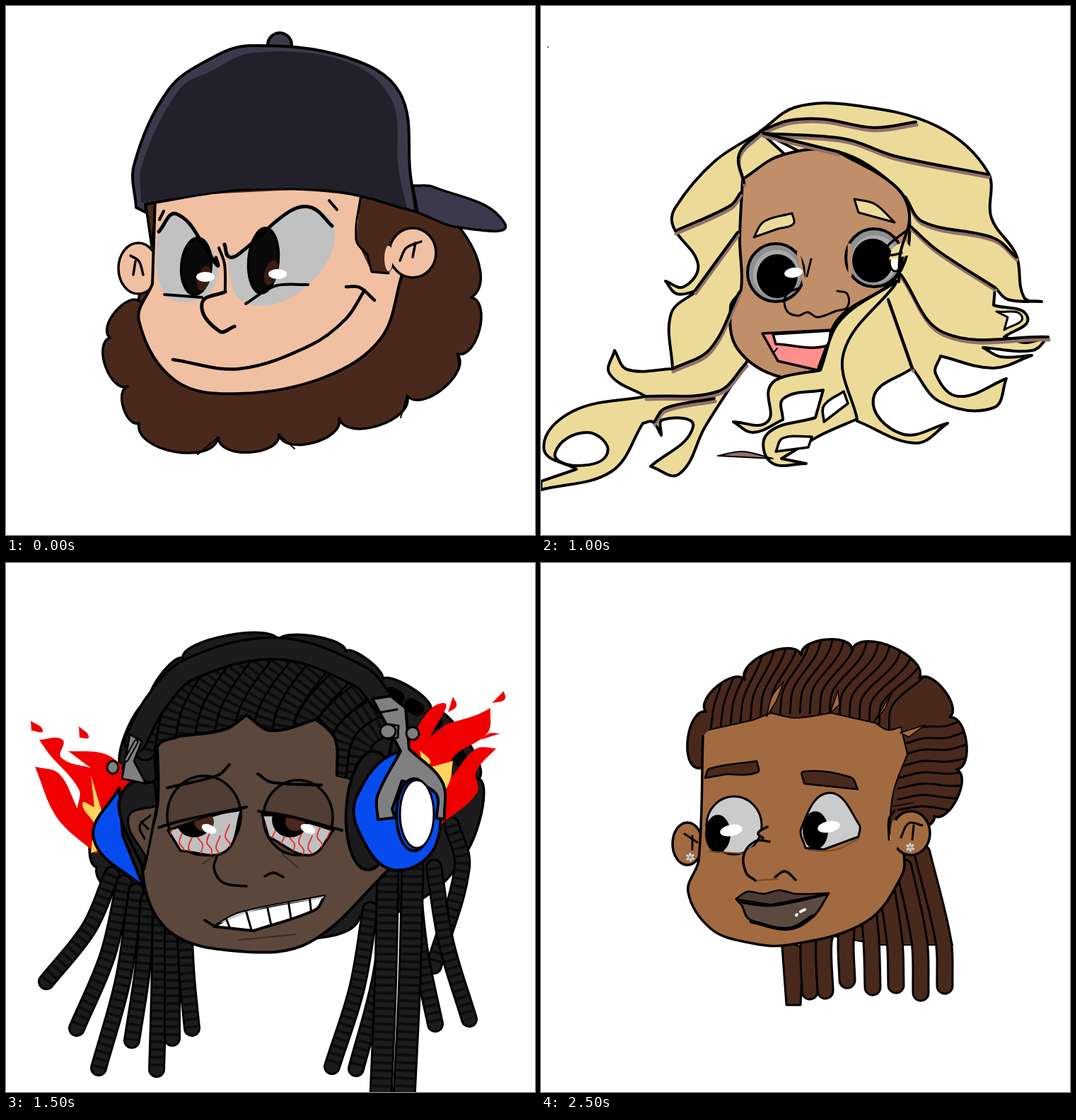
Write an HTML page with a canvas that moves like this. It is 748 px wide and 748 px high and loops after 3000 ms.

```html
<!DOCTYPE html>
<html lang="en">
<head>
<meta charset="utf-8">
<style>
html,body{margin:0;width:100%;height:100%;overflow:hidden;background:#fff}
canvas{display:block;width:100vw;height:100vh}
</style>
</head>
<body>
<canvas id="stage" width="748" height="748"></canvas>
<script>
const g = document.getElementById('stage').getContext('2d');
const TAU = Math.PI * 2, BLACK = '#000', WHITE = '#fff';
g.lineCap = g.lineJoin = 'round';

const pairs = text => (text.match(/-?[\d.]+ -?[\d.]+/g) || []).map(p => p.split(' ').map(Number));
const gap = (a, b) => Math.hypot(b[0] - a[0], b[1] - a[1]) || 1;

// Smooth path through points; "/" makes a corner, a final "z" closes the path.
function trace(text) {
  const path = new Path2D(), closed = text.endsWith('z');
  const parts = text.split('/').map(pairs), first = parts[0][0];
  const loop = closed && parts.length < 2;
  if (closed) parts[parts.length - 1].push(first);
  path.moveTo(...first);
  let last;
  parts.forEach((pts, k) => {
    if (k) pts.unshift(last);
    last = pts[pts.length - 1];
    for (let i = 0; i < pts.length - 1; i++) {
      const b = pts[i], c = pts[i + 1], reach = gap(b, c) * .35;
      const a = pts[i - 1] || (loop ? pts[pts.length - 2] : b);
      const d = pts[i + 2] || (loop ? pts[1] : c);
      const p = reach / gap(a, c), q = reach / gap(b, d);
      path.bezierCurveTo(
        b[0] + (c[0] - a[0]) * p, b[1] + (c[1] - a[1]) * p,
        c[0] - (d[0] - b[0]) * q, c[1] - (d[1] - b[1]) * q, ...c);
    }
  });
  if (closed) path.closePath();
  return path;
}
// Closed outline whose sides all bulge outwards.
function lumps(pts, bulge) {
  const path = new Path2D();
  path.moveTo(...pts[0]);
  pts.forEach((a, i) => {
    const b = pts[(i + 1) % pts.length];
    const x = (b[1] - a[1]) * bulge, y = (a[0] - b[0]) * bulge;
    path.bezierCurveTo(a[0] + x, a[1] + y, b[0] + x, b[1] + y, ...b);
  });
  return path;
}
function paint(path, fill, width, color = BLACK) {
  if (fill) { g.fillStyle = fill; g.fill(path); }
  if (width) { g.lineWidth = width; g.strokeStyle = color; g.stroke(path); }
}
const shape = (text, fill, width = 3.5) => paint(trace(text), fill, width);
const line = (text, width = 3.5, color) => text.split('|').forEach(t => paint(trace(t), null, width, color));
function oval(x, y, rx, ry, fill, width = 0, tilt = 0) {
  const path = new Path2D();
  path.ellipse(x, y, rx, ry, tilt, 0, TAU);
  paint(path, fill, width);
}
function inside(path, draw) {
  g.save(); g.clip(path); draw(); g.restore();
}
// Rope of hair, optionally with cross stripes.
function rope(text, width, color, stripe) {
  line(text, width + 6);
  line(text, width, color);
  if (!stripe) return;
  g.save(); g.lineCap = 'butt'; g.setLineDash([4, 7]);
  line(text, width, stripe);
  g.restore();
}

function capMan() {
  const hair = '#49291c', skin = '#f1c0a2', cloth = '#3b394b';
  paint(lumps(pairs('575 285 658 412 638 492 567 551 471 583 386 606 300 610 188 590 172 538 147 469 190 418 207 395'), .36), hair, 3.5);
  line('271 634 300 610|386 606 408 626|558 582 567 552|638 491 641 513', 2);
  shape('196 270/206 340/215 270/z', hair);
  oval(187, 371, 28, 36, skin, 3.5);
  const jaw = '211 270 207 393/188 445 240 530 330 548 450 525 530 470 560 380';
  shape(jaw + '/575 300/500 255/z', skin, 0);
  line(jaw, 4);
  shape('502 262/495 330/517 376/541 378/600 300/z', hair, 0);
  line('502 265/495 330 511 352/517 376/541 378', 3);
  oval(575, 349, 33, 35, skin, 3.5);
  oval(541, 357, 6, 18, skin);
  line('557 360 566 342 587 333|579 335 575 355|176 353 188 361 194 380|183 361 180 380');
  shape('575 254 605 256 705 307 640 313 582 292/z', cloth);
  oval(387, 55, 17, 17, cloth, 4);
  shape('184 285 181 225 230 118 290 74 345 56 480 72 557 123 572 240 580 291/470 263 330 260 197 280/198 292/z', cloth, 4);
  shape('191 278 192 225 245 118 290 92 350 66 480 78 545 132 555 230 567 285/470 261 330 258/z', '#22212b', 0);
  shape('216 318 241 294 280 333 301 365 280 412 225 407z', '#c1c1c1', 0);
  shape('314 354 335 347 400 290 463 308 429 393 340 421z', '#c1c1c1', 0);
  for (const [x, y, ry, shine, sy] of [[269, 368, 40, 282, 383], [364, 360, 46, 384, 379]]) {
    oval(x, y, 21, ry, '#0a0a0a', 4, .08);
    oval(x + 11, y + 17, 9, 18, '#3a1d14', 0, .3);
    oval(shine, sy, 13, 7, WHITE);
  }
  line('216 319 241 294 285 346 299 367 297 356|309 337 316 355 335 346 400 291 432 285 461 311', 5);
  line('224 408 277 412|339 421 380 396 427 394|301 342 309 365 310 403|217 302 223 290|457 275 468 288', 4);
  shape('310 404 277 421 302 460 323 453', skin, 5);
  line('236 500 330 513 430 480 480 443 507 402|481 397 500 398 521 416', 4.5);
}

function flame(x, y, flip) {
  g.save(); g.translate(x, y); g.scale(flip, 1);
  [['#ee2a10', 1.05], ['#ff9a20', .65], ['#ffe45c', .35]].forEach(([color, k]) => {
    g.setTransform(flip * k, 0, 0, k, x, y + 14 * (1 - k));
    shape('0 17/-8 5 -7 -8/1 -5 8 -18/6 -8 5 12/z', color, 0);
  });
  g.restore();
}
function cable(text, width) {
  line(text, width); line(text, width - 2.6, '#e4e4e1');
}
function afroWoman() {
  const skin = '#5b473b', cord = '#e4e4e1', curls = 46;
  const ring = (a, x, y, rx, ry) => [x + rx * Math.cos(a), y + ry * Math.sin(a)];
  paint(lumps(Array.from({length: curls}, (_, i) => ring(i * TAU / curls, 405, 253, 278, 246)), .22), '#0f0f0f', 5);
  paint(lumps(pairs('220 400 200 265 270 150 365 112 466 98 542 150 583 238 595 325 570 440 465 495 350 400'), .32), BLACK);
  oval(217, 414, 15, 25, '#49382e', 3);
  oval(506, 402, 26, 29, skin);
  const jaw = '235 400 219 465 255 523 340 545 450 517 487 485 494 425';
  shape(jaw + '/520 410 510 374/478 270 360 230 240 320z', skin, 0);
  line(jaw);
  for (let i = 0; i < 15; i++) oval(...ring(TAU / 2 + i * TAU / 28, 372, 331, 144, 98), 16, 16, BLACK);
  line('484 416 492 378 525 383|490 405 507 386', 2.5);
  for (const [x, y, out] of [[290, 379, -1], [411, 381, 1]]) {
    [2.7, 3.6, 4.2, 5.5, 1.1, 1.5, 2].forEach(a => {
      a = out < 0 ? a : TAU / 2 - a;
      line([ring(a, x, y, 40, 43), ring(a + .1, x, y, 49, 52)].join(' ').replace(/,/g, ' '), 5);
    });
    oval(x, y, 41, 44, '#808080', 4);
    oval(x + 4, y - 2, 27, 27, BLACK);
    oval(x + 5, y + 14, 17, 10, '#3a2018');
    oval(x + 2, y + 4, 18, 14, BLACK);
    oval(x + 22, y + 4, 14, 8, WHITE, 0, -.25);
  }
  shape('266 298 275 292 312 288 312 300z', '#111', 2);
  shape('384 305 428 306 427 315 392 312z', '#111', 2);
  line('331 375 313 415 335 458', 3);
  oval(362, 447, 5, 7, null, 4);
  const lip = '297 484/312 477 330 480 345 474 360 479 393 478/';
  shape(lip + '385 502 345 517 303 490/z', '#c62404', 2.5);
  shape(lip + '335 488/z', '#de2d0b', 1);
  line('301 486 345 490 391 479', 4);
  line('361 500 363 499|366 497 369 495', 4, WHITE);
  oval(224, 412, 6, 10, cord, 2);
  oval(511, 404, 9, 14, cord, 2);
  shape('213 416/220 418/218 443/212 442/z', cord, 2);
  shape('518 402/526 403/522 445/516 445/z', cord, 2);
  flame(209, 397, -1);
  flame(529, 391, 1);
  cable('216 443 214 490', 3);
  shape('208 491/214 491/210 535/201 533/z', cord, 2);
  line('208 502 205 527', 3, '#777');
  cable('204 536 225 565 300 570 366 597 375 619', 5);
  cable('519 446 511 512 470 555 394 580 375 622', 6);
  cable('375 615 376 627', 4);
  shape('373 627/381 627/380 644/372 643/z', cord, 2);
  line('376 644 377 659', 3);
}

function strand(text) {
  g.save(); g.translate(1, 4); line(text, 5, '#8f706a'); g.restore();
  line(text, 4);
}
function blondeWoman() {
  const hair = '#ecdb98', skin = '#c08e68';
  oval(10, 58, 1, 1, '#333');
  shape('310 178 245 220 190 285 187 312 222 365 202 397 176 389/192 407 220 403/184 435 186 513/122 514 104 487/97 520 148 552/45 573 4 625 50 655/0 672/0 684/100 658 144 590/158 588 170 607/172 585 215 595 155 651/195 662 232 595 290 505/350 400/345 210/z', hair, 4);
  shape('20 632 65 603 94 632 50 650z', WHITE, 4);
  shape('310 177 360 143 440 140 560 170 632 235 637 300 672 352 683 412 708 418/660 415 642 398/640 423/688 440 655 468/685 476 717 468/695 487 625 483/650 496 694 494/640 512 565 495/558 520 590 552 658 527/640 568 565 560 525 512/470 555 510 605 575 590/530 618 447 587/400 450/470 260/z', hair, 4);
  shape('285 245 340 211 420 206 500 254 521 295 505 380 420 443 395 515/340 525 278 485 268 425 283 400 281 330z', skin, 4);
  for (const [x, y, px, py] of [[332, 377, 334, 382], [471, 356, 469, 360]]) {
    oval(x, y, 40, 41, '#8f8f8f', 4);
    oval(x + 1, y + 2, 33, 34, '#a9a9a9');
    oval(px, py, 29, 31, BLACK);
  }
  line('364 350 372 392|437 380 436 338', 5, skin);
  oval(357, 377, 13, 7, WHITE, 0, -.15);
  oval(501, 362, 8, 13, WHITE, 3);
  shape('301 327/315 305 355 293/357 308 335 315/z', hair, 3);
  shape('443 273/472 280 500 306/449 292/z', hair, 3);
  line('364 399 347 408 347 430 363 438 377 433 391 440 418 431 433 426 433 407 419 403|382 358 376 382', 3);
  shape('313 463/412 458/391 515/335 502/z', '#ff8f8c');
  shape('328 464 410 459/402 481 332 478/z', WHITE);
  line('329 490 334 484', 2);
  shape('503 389 423 445 395 515/338 526 322 542 320 588 272 588/300 603 342 585/343 555 399 543/388 582/320 605 325 645 375 647/340 640/395 607 447 584/428 490 500 395/z', hair, 4);
  shape('400 588/400 565 428 545/434 562/z', WHITE);
  shape('332 630/342 611 383 609/378 624/z', WHITE);
  shape('250 636/285 630 328 640/z', '#8f706a', 2);
  shape('644 432/680 439 655 458/660 440/z', WHITE, 3);
  shape('492 359/498 342 515 332/530 350/z', hair, 0);
  line('510 349 493 352 486 344 520 315');
  ['310 177 350 162 400 160 470 172 530 164', '314 180 430 188 500 212 632 238',
    '314 180 420 206', '310 178 280 210 287 250', '282 264 268 282 190 318', '278 320 218 402',
    '280 405 239 485 186 513', '148 552 250 545 290 505', '160 588 175 569 245 555',
    '515 270 540 305 640 328 672 355', '523 312 560 345 642 398', '509 380 570 462 717 468', '491 415 525 512'].forEach(strand);
  line('420 206 500 254 521 295 508 350 506 390', 4);
}

function dreadMan() {
  const hair = '#1c1c1c', skin = '#5b473b', steel = '#808080', blue = '#064bee', cushion = '#1b1b1b';
  const dread = (t, w) => rope(t, w, hair, '#0c0c0c');
  const hang = (x, y, [tx, ty], w) => dread(`${x} ${y} ${x + (tx - x) * .35} ${(y + ty) / 2} ${tx} ${ty}`, w);
  paint(lumps(pairs('128 430 165 290 205 195 250 135 385 110 480 125 532 165 600 207 668 305 635 420 500 500'), .2), hair, 3.5);
  g.setLineDash([10, 22]); line('545 185 610 228 655 300', 20); g.setLineDash([]);
  pairs('57 592 100 658 131 714 178 675 213 716 235 672 263 658').forEach((tip, i) => hang(150 + i * 17, 440 + i * 12, tip, 18));
  dread('630 370 645 430 605 570', 18);
  pairs('655 645 607 652 495 715 461 712').forEach((tip, i) => hang(605 - i * 30, 430 + i * 20, tip, 18));
  pairs('563 755 530 755').forEach((tip, i) => hang(575 - i * 35, 430, tip, 27));
  ['127 411 72 360 41 288/75 298 101 347/103 320 61 270 47 250/80 250 78 275 120 290/88 266/140 270 180 300/150 400/z',
    '35 223/52 237 36 237/z', '103 231/117 246 104 247/z', '704 181/705 193 687 198/z', '632 189/637 202 625 211/z', '699 241 683 241 671 250/z',
    '615 370 666 325 665 295 693 262/664 263 631 302/632 275 681 240 685 205/665 215 622 228/600 246/617 198 570 250/580 340/z']
    .forEach(t => shape(t, '#f00000', 0));
  shape('120 410/125 368/108 340 125 345/120 300/150 400/z', '#ffd35e', 0);
  shape('585 265/600 280 595 290/632 280/625 315 600 340/z', '#ffd35e', 0);
  shape('214 255 214 345 193 435 230 520 330 549 430 536 545 430/460 240 350 205z', skin, 4);
  const hairline = '212 305 215 258 245 245/310 235 340 215/375 237 442 220/466 250 468 300';
  const scalp = trace(hairline + '/510 310/540 280 535 180 385 115 240 165 165 290/190 330/z');
  paint(scalp, hair, 4);
  inside(scalp, () => {
    for (let i = 0; i < 13; i++) {
      const x = 170 + i * 27, low = Math.max(0, i - 8) * 22;
      dread(`${x} ${265 + low / 2} ${x + 14} ${205 + low / 2} ${x + 60 + i} ${130 + low}`, 25);
    }
  });
  line(hairline, 4);
  const band = '183 252 211 199 260 150 385 121 500 160 532 195';
  line(band, 34);
  line(band, 27, hair);

  shape('160 318/124 390 195 459/165 385/z', blue, 4);
  shape('210 310 174 313 160 350 195 433/214 342/z', cushion, 4);
  shape('213 343 173 360 199 418/z', skin, 3);
  line('204 357 189 372 196 390|191 366 201 376', 3);
  shape('175 242/192 252/181 280/198 312/164 305/z', steel, 3);
  line('170 278 184 253', 7);
  line('170 278 184 253', 3, steel);
  oval(151, 289, 8, 9, steel, 3);
  oval(516, 350, 35, 84, cushion, 4, .06);
  shape('553 268 496 330 500 382 548 434 608 398 600 300z', blue, 4);
  shape('518 192/544 188/565 205/570 263/617 310 620 362/609 361/607 325 560 308/546 348/550 360/526 363/525 330 558 266/z', steel, 4);
  line('525 212 553 207', 3);
  oval(575, 241, 9, 9, steel, 3);
  shape('540 228/555 230/554 247/540 249/z', steel, 3);
  oval(540, 238, 11, 10, steel, 3);
  oval(577, 356, 25, 51, blue, 4);
  oval(581, 355, 24, 48, WHITE, 3);

  oval(280, 357, 52, 56, '#503d33', 3.5);
  oval(413, 360, 49, 53, '#503d33', 3.5);
  ['229 378/300 355 333 349/310 408 247 407/z', '362 356/400 359 463 378/430 413 371 387/z'].forEach((text, i) => {
    const eye = trace(text);
    paint(eye, '#c0c0c0', 3.5);
    inside(eye, () => {
      for (let k = 0; k < 8; k++) {
        const x = 235 + i * 130 + k * 13, y = 370 + k % 3 * 8;
        line(`${x} ${y + 45} ${x + 4} ${y + 28} ${x - 3} ${y + 17} ${x + 3} ${y}`, 1.8, '#e62a20');
      }
      oval(i ? 402 : 266, 363, 26, 25, BLACK);
      oval(i ? 409 : 280, 366, 14, 13, '#4a281b');
    });
    oval(i ? 427 : 287, 376, 11, 6, WHITE, 0, .4);
  });
  line('216 374 250 364 340 345|357 351 400 358 475 378|228 318 300 300 316 285|356 298 375 310 446 314', 4);
  line('298 415 294 432 307 452 340 457|366 443 378 438 392 444|281 505 295 514');
  line('278 425 300 411|390 411 412 430|330 533 410 525', 2, '#3c2c24');
  const mouth = trace('294 514/330 495 450 471/438 490 350 520/z');
  paint(mouth, WHITE, 4);
  inside(mouth, () => {
    line('305 505 360 485 450 470', 7, '#ccc');
    for (let i = 0; i < 5; i++) line(`${308 + i * 30} ${495 - i * 8} ${319 + i * 29} 522`, 3);
  });
}

function bucketMan() {
  const skin = '#c08e68', shade = '#8b8781', brow = '#50281c';
  oval(193, 380, 24, 34, skin, 3.5);
  oval(569, 361, 27, 34, skin, 3.5);
  shape('139 298/240 240/212 330/188 328 158 317/z', shade);
  shape('560 265/612 296/570 331/z', shade);
  shape('216 270 207 395/192 435 220 513 280 540 345 545 480 510 552 405/565 270/400 220/306 212/z', skin);
  oval(551, 358, 7, 30, skin);
  line('182 375 196 390|190 388 187 380|554 372 571 339|562 356 570 354 568 368', 3);
  const hat = trace('201 228 204 180 212 112 228 75 330 41 440 59 520 81 540 99 557 222/588 248 612 296/500 252 400 232 306 222/230 258 139 298/155 265 201 228/z');
  paint(hat, '#d5d2cf');
  inside(hat, () => {
    shape('436 55 483 150 475 195 405 233/620 320/620 50/z', shade, 0);
    shape('139 300/235 256/150 288/z', shade, 0);
  });
  paint(hat, null, 4);
  line('204 180 280 155 370 141 553 181|201 228 300 200 400 198 557 222', 3);
  shape('233 287/250 267 296 248/262 284/z', brow, 3);
  shape('383 235/445 258 461 278/403 263/z', brow, 3);
  line('288 299 293 308|378 291 383 289', 2);
  shape('188 328 278 302 303 318/329 333/340 302 450 287 464 297/588 284/582 327/464 329/452 393 410 415 343 393 330 376/308 376/275 416 205 395z', BLACK, 2);
  oval(206, 335, 10, 6, WHITE);
  oval(443, 309, 10, 6, WHITE);
  for (const [x, y] of [[262, 340], [408, 335]])
    shape(`${x} ${y} ${x + 15} ${y - 5} ${x + 24} ${y + 6} ${x + 3} ${y + 49} ${x + 1} ${y + 25}z`, WHITE, 0);
  line('300 397 304 412 329 425|350 423 353 409 367 405');
  for (let i = 0; i < 6; i++) oval(307 + i * 7.5, 397 + 15 * Math.sin(i * 2), 2.3, 2, '#936344');
  oval(452, 401, 2.3, 2, '#936344');
  const mouth = trace('256 452/290 466 340 472 400 464 457 437/446 480 402 516 345 525 267 483/z');
  paint(mouth, WHITE);
  inside(mouth, () => {
    line('256 456 340 477 457 442', 9, '#ddd');
    for (let i = 0; i < 6; i++) line(`${265 + i * 33} 450 ${264 + i * 34} 526`, 3);
  });
  paint(mouth, null, 4);
  line('251 459 261 450|443 435 460 442');
}

function braidWoman() {
  const hair = '#49291c', skin = '#a26a40';
  shape('340 530/347 625/367 625/371 545/z', hair, 3);
  shape('370 520/540 395/582 540/480 540/z', hair, 2);
  pairs('380 606 402 605 433 590 469 600 502 597 537 608 571 598').forEach(([x, y], i) =>
    rope(`${383 + i * 26} ${530 - i * 20} ${x - 2} 535 ${x} ${y}`, 19, hair));
  const crown = lumps(pairs('222 290 233 210 288 165 368 130 440 122 535 163 578 218 588 292 556 358 500 370 235 260'), .33);
  paint(crown, hair, 3.5);
  inside(crown, () => {
    for (let i = 0; i < 19; i++) {
      const x = 240 + i * 14, y = 236 - 24 * Math.sin(i / 18 * Math.PI), lean = 22 + i * 2;
      line(`${x} ${y} ${x + 5} ${y - 35} ${x + lean} ${y - 85} ${x + lean + 12} ${y - 130}`, 2.8);
    }
    for (let i = 0; i < 8; i++) {
      const y = 244 + i * 15;
      line(`505 ${y} 540 ${y - 12 + i} 575 ${y - 14 + i * 2} 610 ${y - 30 + i * 5}`, 2.8);
    }
  });
  oval(207, 397, 21, 30, skin, 3.5);
  const jaw = '229 245 223 420 208 465 240 517 290 536 350 540 460 507 511 440 513 405';
  const hairline = '/492 390/498 325 518 270/509 232/490 236 472 226/410 212/360 219 325 212/300 222/237 236';
  shape(jaw + hairline + '/z', skin, 0);
  line(jaw);
  line(hairline.slice(1), 2);
  ['319 217/327 188 343 168/333 195/z', '409 212/420 180/422 200/z', '471 224/496 184/487 205/z',
    '508 240/543 229/520 246/z', '496 344/527 339/z'].forEach(t => shape(t, skin, 1.5));
  oval(523, 382, 27, 31, skin, 3.5);
  oval(500, 385, 6, 22, skin);
  line('492 391 492 362 500 350|509 388 520 368 539 371|527 371 525 391|203 383 221 395|214 386 214 405', 3);
  for (const [x, y] of [[211, 416], [522, 402]]) {
    for (let i = 0; i < 3; i++) {
      const dx = 5 * Math.cos(i + .5), dy = 5 * Math.sin(i + .5);
      line(`${x - dx} ${y - dy} ${x + dx} ${y + dy}`, 3, '#d0d4d4');
    }
    oval(x, y, 2, 2, '#888');
  }
  shape('232 304/238 291 305 280/306 296 260 299/z', hair, 2.5);
  shape('372 312/371 295 438 303 448 320/z', hair, 2.5);
  oval(273, 371, 39, 41, '#cbcbcb', 3);
  shape('374 403/368 375 407 325 450 370 449 387/400 405/z', '#cbcbcb', 3);
  for (const [x, y] of [[250, 383], [388, 378]]) {
    oval(x, y, 18, 27, BLACK);
    oval(x + 19, y - 5, 16, 8, WHITE, 0, -.2);
  }
  line('238 408 290 411|378 406 415 406 449 390|303 449 334 447', 2, '#774824');
  shape('323 394 287 412 303 449/340 440/z', skin, 0);
  oval(317, 382, 9, 9, skin);
  line('320 373 307 382 314 389|323 394 304 393 287 412 290 438 303 449|331 444 345 436 360 448');
  const lip = '276 475/292 465 315 468 337 463 360 468 407 467/';
  shape(lip + '385 500 350 518 295 504 284 484/z', '#5b4a40', 3);
  shape(lip + '325 483/z', '#4c3b33', 2);
  line('280 479 325 484 405 468', 4);
  line('297 507 350 517 385 499', 5);
  line('361 498 362 497|367 493 373 490', 4, WHITE);
}

const portraits = [capMan, afroWoman, blondeWoman, dreadMan, bucketMan, braidWoman];
const start = performance.now();
let shown = -1;
function tick() {
  const index = Math.floor((performance.now() - start) / 500) % portraits.length;
  if (index !== shown) {
    shown = index;
    g.fillStyle = WHITE;
    g.fillRect(0, 0, 748, 748);
    portraits[index]();
  }
  requestAnimationFrame(tick);
}
tick();
</script>
</body>
</html>
```
